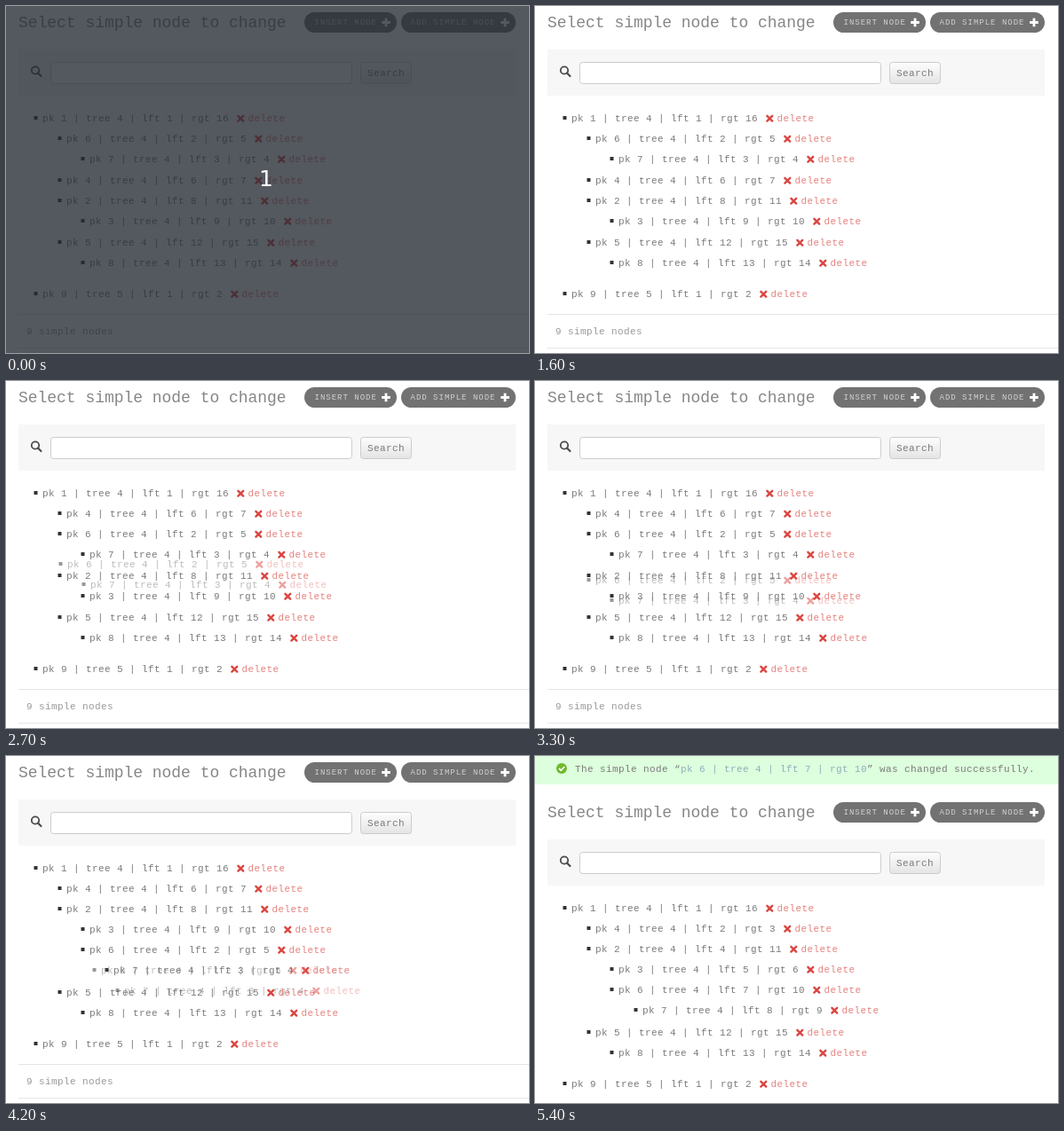
An HTML page for the animation above (8000 ms loop, 589 px wide and 391 px high).

```html
<!DOCTYPE html>
<html lang="en">
<head>
<meta charset="utf-8">
<title>Sortable node tree</title>
<style>
html, body { margin: 0; width: 100%; height: 100%; overflow: hidden; background: #fff; }
svg { display: block; width: 100%; height: 100%; }
text { font: 11px "Liberation Mono", "Courier New", monospace; letter-spacing: .4px; fill: #7b7b7b; white-space: pre; }
.title { font-size: 18px; letter-spacing: -.03px; fill: #868686; }
.btn { font-size: 9px; letter-spacing: 1px; fill: #d2d2d2; }
.del { fill: #e4827e; }
.link { fill: #8dafbd; }
.count { fill: #9a9a9a; }
.num { font: 25px "DejaVu Sans", sans-serif; letter-spacing: 0; fill: #fff; }
</style>
</head>
<body>
<svg viewBox="0 0 589 391">
  <defs>
    <linearGradient id="shade" x1="0" y1="0" x2="0" y2="1">
      <stop offset="0" stop-color="#fdfdfd"/><stop offset="1" stop-color="#e4e4e4"/>
    </linearGradient>
    <path id="plus" d="M-4.8 0H4.8M0-4.8V4.8" stroke="#fff" stroke-width="2.8"/>
    <path id="cross" d="M-2.9-2.9L2.9 2.9M2.9-2.9L-2.9 2.9" stroke="#db4540" stroke-width="2.4" stroke-linecap="round"/>
  </defs>

  <g id="message">
    <rect width="589" height="32" fill="#dfd"/>
    <circle cx="30" cy="14" r="6" fill="#6fb92c"/>
    <path d="M27 14l2.3 2.3L33.2 12" fill="none" stroke="#fff" stroke-width="1.8"/>
    <text x="45" y="18">The simple node “<tspan class="link" id="changed"></tspan>” was changed successfully.</text>
  </g>

  <g id="page">
    <text class="title" x="14" y="24">Select simple node to change</text>
    <rect x="336" y="7" width="104" height="23" rx="11.5" fill="#727272"/>
    <text class="btn" x="347.5" y="21">INSERT NODE</text>
    <use href="#plus" x="428" y="18.5"/>
    <rect x="445" y="7" width="129" height="23" rx="11.5" fill="#727272"/>
    <text class="btn" x="455.5" y="21">ADD SIMPLE NODE</text>
    <use href="#plus" x="562" y="18.5"/>

    <rect x="14" y="49" width="560" height="52" fill="#f7f7f7"/>
    <circle cx="33" cy="72.5" r="4.2" fill="none" stroke="#4a4a4a" stroke-width="1.8"/>
    <path d="M36 75.5L39.5 79" stroke="#4a4a4a" stroke-width="2.2" stroke-linecap="round"/>
    <rect x="50.5" y="63.5" width="339" height="24" rx="3" fill="#fff" stroke="#ccc"/>
    <rect x="399.5" y="63.5" width="57" height="24" rx="3" fill="url(#shade)" stroke="#ccc"/>
    <text x="407" y="78.5">Search</text>

    <g id="rows"></g>
    <g id="ghost" opacity=".5"></g>

    <path d="M14 347.5H589M14 385.5H589" stroke="#e5e5e5"/>
    <text class="count" x="23" y="370">9 simple nodes</text>
  </g>

  <g id="veil">
    <rect width="589" height="391" fill="#242932" fill-opacity=".78"/>
    <text class="num" x="285" y="203">1</text>
  </g>
</svg>

<script>
const LOOP = 8000, STEP = 100;
const LOWER = 2700, NEST = 3500, DROP = 5100, SAVE = 5300;
const $ = id => document.getElementById(id);
const show = (el, on) => el.setAttribute("visibility", on ? "visible" : "hidden");

// Turns "pk(children)" notation into rows with depth and height.
function outline(spec) {
  const rows = [];
  let depth = 0, y = 126;
  for (const c of spec) {
    if (c === "(") depth++;
    else if (c === ")") { depth--; y++; }  // a closed list adds a pixel
    else {
      if (rows.length && !depth) y += 10;
      rows.push({ pk: c, depth, y });
      y += 23;
    }
  }
  return rows;
}

// Nested-set labels, keyed by pk.
function number(spec) {
  const labels = {}, open = [];
  let tree = 3, n = 0, depth = 0;
  const close = to => {
    while (open.length > to) {
      const { pk, lft } = open.pop();
      labels[pk] = `pk ${pk} | tree ${tree} | lft ${lft} | rgt ${++n}`;
    }
  };
  for (const { pk, depth } of outline(spec)) {
    close(depth);
    if (!depth) { tree++; n = 0; }
    open.push({ pk, lft: ++n });
  }
  close(0);
  return labels;
}

const first = "1(6(7)42(3)5(8))9";
const lower = "1(46(7)2(3)5(8))9";
const nested = "1(42(36(7))5(8))9";
const before = number(first), after = number(nested);

// drag offset: time, dx, dy
const drag = [
  [1700, 9, 4], [2000, 9, 22], [2300, 6.5, 32], [2800, 0, 63],
  [3300, 0, 75], [3900, 3, 97], [4200, 39, 92], [4400, 51.5, 89.5], [4800, 54.5, 89]
];

function row({ pk, depth, y }, labels) {
  const x = 41 + Math.ceil(depth * 26.4), end = x + labels[pk].length * 7;
  return `<rect x="${x - 9.5}" y="${y - 2}" width="4" height="4" fill="#333"/>
    <text x="${x}" y="${y + 4}">${labels[pk]}</text>
    <use href="#cross" x="${end + 13.3}" y="${y + .7}"/>
    <text class="del" x="${end + 21.5}" y="${y + 4}">delete</text>`;
}

const list = (rows, labels) => rows.map(r => row(r, labels)).join("");

function dragAt(t) {
  const i = drag.findIndex(k => k[0] > t);
  if (i < 0) return drag[drag.length - 1].slice(1);
  const [t0, x0, y0] = drag[i - 1], [t1, x1, y1] = drag[i];
  const p = (t - t0) / (t1 - t0);
  return [x0 + (x1 - x0) * p, y0 + (y1 - y0) * p];
}

function render(t) {
  const saved = t >= SAVE;
  const spec = t < LOWER ? first : t < NEST ? lower : nested;
  $("rows").innerHTML = list(outline(spec), saved ? after : before);
  $("page").setAttribute("transform", `translate(0 ${saved ? 45 : 0})`);
  show($("message"), saved);

  const dragging = t >= drag[0][0] && t < DROP;
  show($("ghost"), dragging);
  if (dragging) {
    const [x, y] = dragAt(t).map(Math.round);
    $("ghost").setAttribute("transform", `translate(${x} ${y})`);
  }
  show($("veil"), t < 100);
}

$("changed").textContent = after[6];
$("ghost").innerHTML = list(outline(first).slice(1, 3), before);
render(0);

let start, last = 0;
function tick(now) {
  start ??= now;
  const t = Math.floor((now - start) % LOOP / STEP) * STEP;
  if (t !== last) render(last = t);
  requestAnimationFrame(tick);
}
requestAnimationFrame(tick);
</script>
</body>
</html>
```
